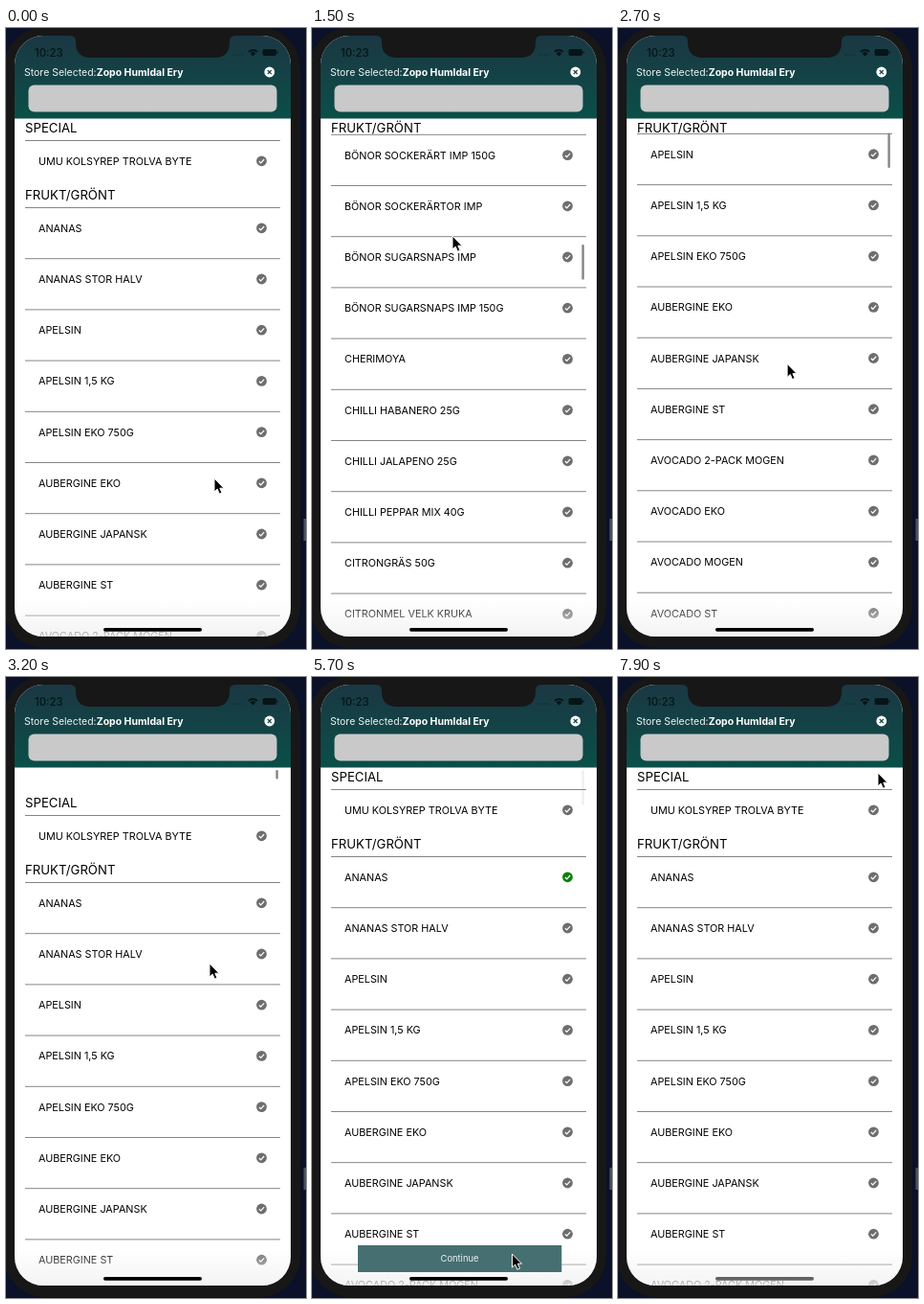
Write an HTML page that moves like this. It is 314x648 px and loops after 8 s.

```html
<!DOCTYPE html>
<html lang="sv">
<head>
<meta charset="utf-8">
<title>Grocery list</title>
<style>
html, body { margin: 0; width: 100%; height: 100%; overflow: hidden; background: #0a1128; }
svg { display: block; width: 314px; height: 648px; font-family: Inter, Roboto, sans-serif; }
.row { font-size: 10.8px; }
.head { font-size: 13.2px; }
</style>
</head>
<body>
<svg viewBox="0 0 314 648">
  <defs>
    <linearGradient id="teal" x1="0" y1="0" x2="0" y2="1">
      <stop offset="0" stop-color="#1b3743"/>
      <stop offset="1" stop-color="#0a4f48"/>
    </linearGradient>
    <linearGradient id="shade" x1="0" y1="0" x2="0" y2="1">
      <stop offset="0" stop-color="#f3f3f4" stop-opacity="0"/>
      <stop offset="1" stop-color="#f0f0f2" stop-opacity=".8"/>
    </linearGradient>
    <clipPath id="screen"><rect x="9" y="8" width="289" height="627" rx="30"/></clipPath>
    <clipPath id="listArea"><rect x="9" y="94.5" width="289" height="541"/></clipPath>
    <g id="tick">
      <circle r="5.4"/>
      <path d="M-2.6 .2L-.8 2L2.7-1.8" fill="none" stroke="#fff" stroke-width="1.2"/>
    </g>
  </defs>

  <rect width="314" height="648" fill="#0a1128"/>
  <rect x="311.5" y="512" width="3" height="23" fill="#49525f"/>
  <rect x="-2" y="-1" width="310" height="648" rx="42" fill="#171717"/>

  <g clip-path="url(#screen)">
    <rect x="9" y="8" width="289" height="627" fill="#fff"/>
    <g clip-path="url(#listArea)">
      <g id="rows"></g>
      <rect x="9" y="595" width="289" height="40" fill="url(#shade)"/>
      <text class="head" id="special" x="20">SPECIAL</text>
      <text class="head" id="fruit" x="20">FRUKT/GRÖNT</text>
      <rect id="bar" x="282.4" width="2.4" rx="1.2" fill="#858585"/>
    </g>
    <rect x="9" y="8" width="289" height="86.5" fill="url(#teal)"/>
    <g fill="#061518">
      <text x="30" y="29.5" font-size="11.4" font-weight="500">10:23</text>
      <path d="M253.3 24.2a7.4 7.4 0 0 1 10.4 0l-1.3 1.4a5.6 5.6 0 0 0-7.8 0zM255.5 26.4a4.3 4.3 0 0 1 6 0L258.5 29.6z"/>
      <rect x="268.5" y="22" width="14.5" height="7" rx="2"/>
      <rect x="283.5" y="24" width="1" height="3"/>
      <path d="M237 28h11" stroke="#061518" stroke-opacity=".35" stroke-width="1.6" stroke-dasharray="1.6 1.5"/>
    </g>
    <text x="19" y="49.8" font-size="10.5" fill="#eef3f3">Store Selected:<tspan font-weight="700" fill="#fff">Zopo Humldal Ery</tspan></text>
    <circle cx="275.8" cy="46" r="5.4" fill="#fff"/>
    <path d="M273.8 44l4 4m0-4l-4 4" stroke="#17443f" stroke-width="1.2"/>
    <rect x="23.5" y="59.5" width="260" height="28" rx="6" fill="#c9c9c9"/>
    <g id="button">
      <rect x="48" y="593" width="213.3" height="28" fill="#456f70"/>
      <text x="154.5" y="610.4" font-size="9.4" text-anchor="middle" fill="#eef3f3">Continue</text>
    </g>
    <rect id="home" x="102" y="626" width="103" height="3.7" rx="1.85"/>
  </g>
  <path d="M67 7V8Q73 8 73 14V15Q73 31 89 31H218Q234 31 234 15V14Q234 8 240 8V7Z" fill="#171717"/>
  <path id="cursor" d="M0 0V14L3.2 11.1L5.4 16.2L8 15.1L5.8 10.2H10Z" stroke="#fff" stroke-width="1"/>
</svg>
<script>
const LOOP = 8000, STEP = 100;
const LIST_TOP = 94, HEADER = 23.5, ROW = 53.2, FRUIT_TOP = 164;
const CHECKED = [4700, 7400];

const items = `ANANAS|ANANAS STOR HALV|APELSIN|APELSIN 1,5 KG|APELSIN EKO 750G|AUBERGINE EKO
AUBERGINE JAPANSK|AUBERGINE ST|AVOCADO 2-PACK MOGEN|AVOCADO EKO|AVOCADO MOGEN|AVOCADO ST
BABYLEAF 65G|BABYMAJS 125G|BABYMOROTTER 500G|BANAN EKO RÄTTVISEMÄ VELK|BANAN SÄLJBAR
BANAN SÄLJBAR EKO|BASILIKA KRUKA EKO|BASILIKA STOR KRUKA EKO|BJÖRNBÄR 125G|BLADSELLERI
BLADSELLERI EKO|BLOMKÅL EKO|BLOMKÅL FÄRGAD MIX|BLOMKÅL ST|BLÅBÄR 125G|BLÅBÄR EKO|BROCCOLI 250G
BROCCOLI EKO|BRYSSELKÅL 300G|BÖNGRODDAR 200G|BÖNOR HARICOTS|BÖNOR HARICOTS 150G
BÖNOR SOCKERÄRT IMP 150G|BÖNOR SOCKERÄRTOR IMP|BÖNOR SUGARSNAPS IMP|BÖNOR SUGARSNAPS IMP 150G
CHERIMOYA|CHILLI HABANERO 25G|CHILLI JALAPENO 25G|CHILLI PEPPAR MIX 40G|CITRONGRÄS 50G
CITRONMEL VELK KRUKA|CITRON EKO|CITRON ST|CLEMENTIN`.split(/[|\n]/);

// [time, scroll offset]
const scrollKeys = [[0, 0], [100, 0], [400, 260], [700, 720], [1100, 1150], [1500, 1885], [1700, 2060],
  [1900, 1760], [2300, 847], [2600, 330], [2900, -10], [3200, -27], [3500, -50], [3800, -12], [4100, 0]];

// [time, x, y]
const cursorKeys = [[0, 218, 470], [150, 215, 470], [400, 190, 205], [750, 165, 470], [950, 158, 210],
  [1200, 150, 480], [1500, 147, 217], [1700, 146, 200], [1950, 145, 500], [2100, 147, 260],
  [2300, 143, 532], [2600, 165, 280], [2850, 195, 480], [3200, 213, 299], [3500, 218, 345],
  [3900, 250, 240], [4300, 265.5, 208], [4900, 265.5, 208], [5500, 215, 595], [5700, 209.5, 602],
  [6200, 200, 604], [6500, 110, 603], [6700, 150, 560], [7100, 265, 208], [7450, 265, 208], [7900, 272, 100]];

const $ = id => document.getElementById(id);
const clamp = v => Math.max(0, Math.min(1, v));

// Monotone cubic through the keys, so extremes stay at the keys.
function sample(keys, t, col = 1) {
  const last = keys.length - 1;
  if (t >= keys[last][0]) return keys[last][col];
  const i = keys.findIndex((k, n) => n < last && t < keys[n + 1][0]);
  const slope = n => (keys[n + 1][col] - keys[n][col]) / (keys[n + 1][0] - keys[n][0]);
  const tangent = n => {
    if (n === 0 || n === last) return 0;
    const a = slope(n - 1), b = slope(n);
    return a * b <= 0 ? 0 : 2 * a * b / (a + b);
  };
  const h = keys[i + 1][0] - keys[i][0], u = (t - keys[i][0]) / h, v = 1 - u;
  return keys[i][col] * (1 + 2 * u) * v * v + keys[i + 1][col] * u * u * (3 - 2 * u)
    + h * u * v * (tangent(i) * v - tangent(i + 1) * u);
}

function rowMarkup(name, y, id) {
  return `<g transform="translate(0 ${y})"><path d="M20 0H287" stroke="#858585"/>
    <text class="row" x="34" y="25.3">${name}</text>
    <use id="${id}" href="#tick" x="267.5" y="21.3" fill="#6e6e6e"/></g>`;
}

$('rows').innerHTML = rowMarkup('UMU KOLSYREP TROLVA BYTE', LIST_TOP + HEADER, 'bytTick') +
  items.map((name, i) => rowMarkup(name, FRUIT_TOP + HEADER + i * ROW, 'tick' + i)).join('');

function render(t) {
  const scroll = sample(scrollKeys, t);
  const over = Math.max(0, -scroll);
  const checked = t >= CHECKED[0] && t < CHECKED[1];

  $('rows').setAttribute('transform', `translate(0 ${-scroll})`);
  const fruitTop = Math.max(LIST_TOP, FRUIT_TOP - scroll);
  const specialTop = Math.min(LIST_TOP + over, FRUIT_TOP - scroll - HEADER);
  $('special').setAttribute('y', specialTop + 14.6);
  $('fruit').setAttribute('y', fruitTop + 14.6);

  $('bar').setAttribute('y', 97 + Math.max(0, scroll) * .0685);
  $('bar').setAttribute('height', Math.max(5, 36.5 - over));
  $('bar').setAttribute('opacity', t < 200 ? 0 : clamp((5740 - t) / 300));

  $('tick0').setAttribute('fill', checked ? '#0b800b' : '#6e6e6e');
  $('button').setAttribute('visibility', checked ? 'visible' : 'hidden');
  $('home').setAttribute('opacity', 1 - .4 * clamp((t - 7500) / 400));
  $('cursor').setAttribute('transform', `translate(${sample(cursorKeys, t)} ${sample(cursorKeys, t, 2)})`);
}

const start = performance.now();
function tick() {
  const t = (performance.now() - start) % LOOP;
  render(Math.floor(t / STEP) * STEP);
  requestAnimationFrame(tick);
}
tick();
</script>
</body>
</html>
```
